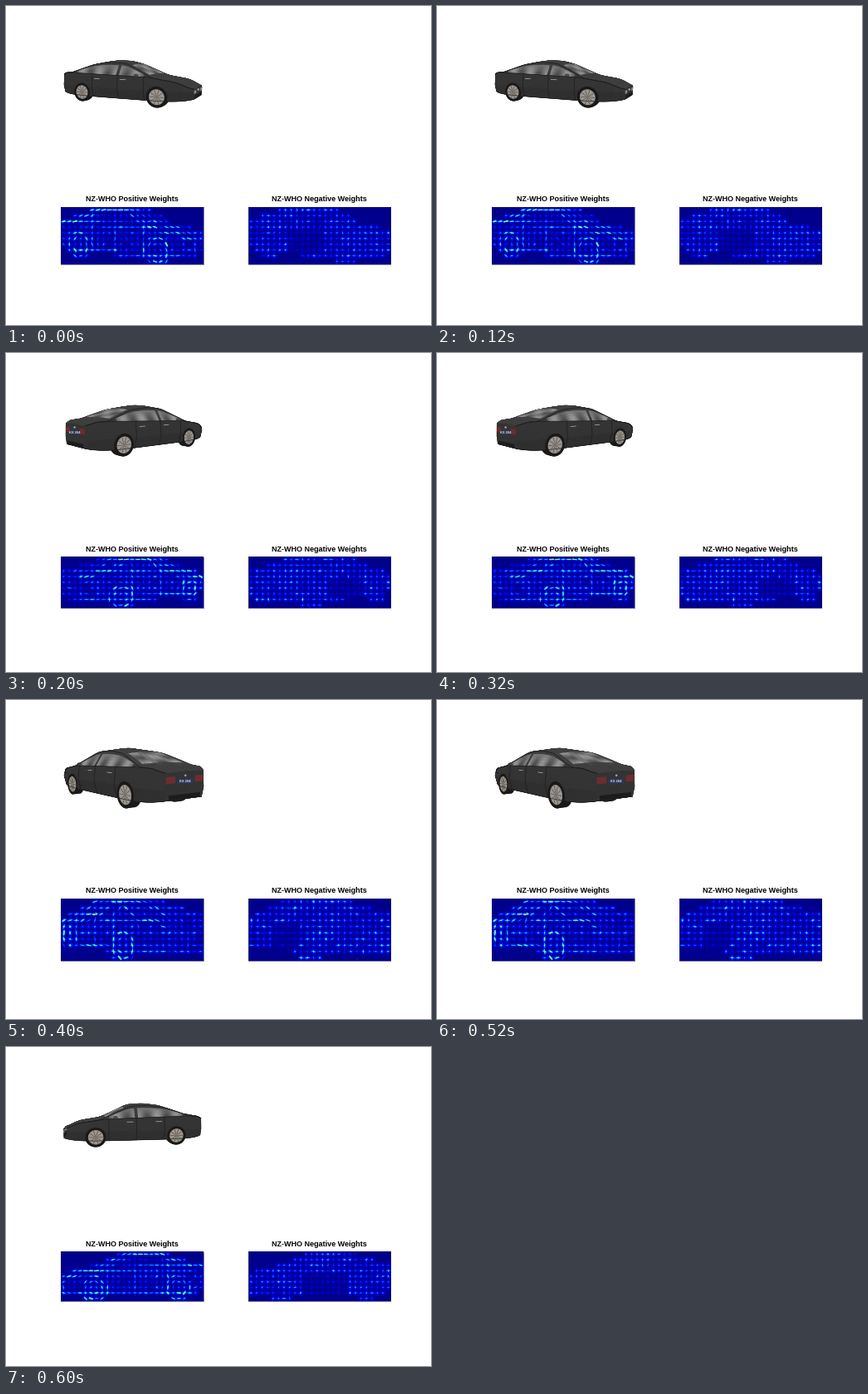
A matplotlib script for the animation above (0.8 s loop, 512 by 384 pixels).

```python
import numpy as np
import matplotlib.pyplot as plt
from matplotlib.animation import FuncAnimation
from matplotlib.collections import PolyCollection
from matplotlib.patches import Ellipse, Polygon

W, H = 512, 384
PANEL_X, PANEL_W, PANEL_MID = (66, 291.6), 171.6, 276.4
BINS, CELL = 9, 20
BLACK, SEAM, CHROME, RIM, RED = "#191919", "#1c1c1c", "#b9b9b9", "#9d9690", "#6d2c30"

# Heading in degrees (0 drives right, 90 towards the viewer), pixel box, weight grid
POSES = [(27, (70, 65.5, 236, 122.5), (25, 10)),
         (-40, (72, 63, 236, 124.5), (25, 9)),
         (-125, (70, 58, 238, 130.5), (23, 10)),
         (170, (69.5, 68, 235, 120.5), (26, 9))]

# The car in metres: x forward, y sideways, z up
LENGTH, AXLE, TRACK, TIRE_R = 2.45, 1.4, 0.9, 0.34
DOORS = (0.95, 0.05, -0.95)
DISTANCE, TILT, EYE = 9, np.radians(5), 0.7
STEPS = 5                                # subdivisions between section knots
SILL, WAIST, BELT, RAIL, TOP = range(1, 6)
HALF = np.linspace(0, TOP, TOP * STEPS + 1)
RING = np.concatenate([HALF, HALF[::-1]])

fig = plt.figure(figsize=(W / 72, H / 72), dpi=72, facecolor="white")
ax = fig.add_axes([0, 0, 1, 1])


def rounded(x, xs, ys):
    """Piecewise linear profile with softened corners."""
    return np.mean([np.interp(x + d, xs, ys) for d in np.linspace(-0.15, 0.15, 7)], axis=0)


def cabin_height(x):
    return rounded(x, [-1.9, -1.0, -0.35, 0.25, 1.2], [0, 0.38, 0.48, 0.46, 0])


def build_body():
    """Loft closed cross-sections along x, pinched shut at both bumpers."""
    x = np.linspace(-LENGTH, LENGTH, 90)
    x = np.concatenate([x[:1], x, x[-1:]])
    belt = rounded(x, [-2.45, -2.3, -1.8, 1.1, 2.0, 2.45], [0.9, 1.04, 1.05, 0.96, 0.82, 0.6])
    cabin = cabin_height(x)
    width = 0.92 * (1 - np.abs(x / 2.55) ** 6) ** 0.25
    floor = 0.2 + 0.1 * (x / LENGTH) ** 6
    none = np.zeros_like(x)
    ys = [none, 0.9 * width, width, 0.95 * width, 0.95 * width - 0.55 * cabin, none]
    zs = [floor, floor, none + 0.55, belt, belt + 0.9 * cabin, belt + cabin + 0.03]
    y = np.array([np.interp(RING, range(6), knots) for knots in np.transpose(ys)])
    z = np.array([np.interp(RING, range(6), knots) for knots in np.transpose(zs)])
    y[:, len(HALF):] *= -1
    y[[0, -1]], z[[0, -1]] = 0, 0.6
    return np.stack([np.broadcast_to(x[:, None], y.shape), y, z], axis=2)


BODY = build_body()
QUADS = np.stack([BODY[:-1, :-1], BODY[1:, :-1], BODY[1:, 1:], BODY[:-1, 1:]],
                 axis=2).reshape(-1, 4, 3)


def paint():
    """Grey level of each body quad: shaded paint, or windows by position."""
    mid = QUADS.mean(axis=1)
    normal = np.cross(QUADS[:, 2] - QUADS[:, 0], QUADS[:, 3] - QUADS[:, 1])
    normal /= np.linalg.norm(normal, axis=1, keepdims=True) + 1e-9
    outward = mid - (0, 0, 0.6)
    outward[:, 0] = 0
    upward = normal[:, 2] * np.sign((normal * outward).sum(axis=1))
    grey = 0.2 + 0.05 * upward

    knot, part = np.divmod(np.tile((RING[:-1] + RING[1:]) / 2, len(BODY) - 1), 1)
    x, y, _ = mid.T
    cabin = cabin_height(x)
    side = (knot == BELT) & (part < 0.85) & (cabin > 0.12) & (np.abs(x - DOORS[1]) > 0.06)
    screen = (knot == RAIL) & (part > 0.2) & (cabin > 0.06) & (cabin < 0.37)
    glass = side | screen
    grey[glass] = (0.46 + 0.16 * np.cos(9 * x) * np.cos(7 * y))[glass]
    return grey


GREY = paint()


def disc(x, y, radius):
    t = np.linspace(0, 2 * np.pi, 41)
    return np.column_stack([x + radius * np.cos(t), np.full_like(t, y),
                            TIRE_R + radius * np.sin(t)])


def project(points, heading):
    """Perspective view; returns screen points (y down) and nearness."""
    x, y, z = np.moveaxis(np.asarray(points, float), -1, 0)
    c, s = np.cos(heading), np.sin(heading)
    across, near, up = x * c - y * s, x * s + y * c, z - EYE
    depth = near * np.cos(TILT) + up * np.sin(TILT)
    rise = up * np.cos(TILT) - near * np.sin(TILT)
    scale = 1 / (1 - depth / DISTANCE)
    return np.stack([across * scale, -rise * scale], axis=-1), depth


class View:
    def __init__(self, degrees, box, grid):
        self.heading = np.radians(degrees)
        self.grid = grid
        self.corner, self.size = np.array(box[:2]), np.subtract(box[2:], box[:2])
        self.side = 1 if np.cos(self.heading) > 0 else -1
        solid = [BODY.reshape(-1, 3)]
        solid += [disc(x, y, TIRE_R) for x in (-AXLE, AXLE) for y in (-TRACK, TRACK)]
        flat = project(np.concatenate(solid), self.heading)[0]
        self.low, self.span = flat.min(axis=0), np.ptp(flat, axis=0)
        self.outline = self.pixels(np.concatenate(solid))
        self.top = PANEL_MID - PANEL_W / grid[0] * grid[1] / 2

    def pixels(self, points):
        flat = project(points, self.heading)[0]
        return self.corner + (flat - self.low) / self.span * self.size

    def cells(self, points):
        return (self.pixels(points) - self.corner) / self.size * self.grid

    def near_index(self, knot):
        return knot * STEPS if self.side > 0 else len(RING) - 1 - knot * STEPS

    def rail(self, knot):
        return BODY[1:-1, self.near_index(knot)]

    def section(self, x, start, end):
        i = np.abs(BODY[:, 0, 0] - x).argmin()
        a, b = sorted((self.near_index(start), self.near_index(end)))
        return BODY[i, a:b + 1]


VIEWS = [View(*pose) for pose in POSES]


def stroke_templates():
    """One soft bar per orientation bin, as in a gradient histogram glyph."""
    y, x = np.mgrid[:CELL, :CELL] - (CELL - 1) / 2
    angle = (np.arange(BINS) * np.pi / BINS)[:, None, None]
    along = np.abs(x * np.cos(angle) + y * np.sin(angle))
    across = y * np.cos(angle) - x * np.sin(angle)
    return np.exp(-(across / 1.7) ** 2) * (along < CELL * 0.45)


STROKES = stroke_templates()


def add_contour(weights, points, gain):
    """Add a polyline, in cell units, to the orientation histograms it crosses."""
    rows, cols, _ = weights.shape
    for start, end in zip(points[:-1], points[1:]):
        dx, dy = end - start
        length = np.hypot(dx, dy)
        n = max(1, round(length * 12))
        spots = start + (end - start) * (np.arange(n) + 0.5)[:, None] / n
        c = np.clip(spots[:, 0].astype(int), 0, cols - 1)
        r = np.clip(spots[:, 1].astype(int), 0, rows - 1)
        b = round(np.arctan2(dy, dx) % np.pi / np.pi * BINS) % BINS
        np.add.at(weights, (r, c, b), gain * length / n)


def covered_cells(view):
    cols, rows = view.grid
    spots = (view.outline - view.corner) / view.size * view.grid
    inside = np.zeros((rows, cols), bool)
    for c in range(cols):
        column = spots[np.abs(spots[:, 0] - c - 0.5) < 0.6, 1]
        inside[int(column.min()):int(np.ceil(column.max())), c] = True
    return inside


def glyph_image(weights):
    rows, cols, _ = weights.shape
    image = np.einsum("rco,oij->ricj", weights, STROKES)
    return image.reshape(rows * CELL, cols * CELL)


def weight_images(view, seed):
    rng = np.random.default_rng(seed)
    cols, rows = view.grid
    inside = covered_cells(view)[..., None]

    edges = np.zeros((rows, cols, BINS))
    for knot in (SILL, BELT, RAIL, TOP):
        add_contour(edges, view.cells(view.rail(knot)), 0.22)
    for x in (-LENGTH, *DOORS, LENGTH):
        add_contour(edges, view.cells(view.section(x, SILL, TOP)), 0.2)
    hubs = []
    for x in (-AXLE, AXLE):
        add_contour(edges, view.cells(disc(x, view.side * TRACK, TIRE_R)), 0.42)
        add_contour(edges, view.cells(disc(x, view.side * TRACK, TIRE_R * 0.45)), 0.2)
        add_contour(edges, view.cells(disc(x, -view.side * TRACK, TIRE_R)), 0.12)
        hubs.append(view.cells((x, view.side * TRACK, TIRE_R)))
    edges *= rng.uniform(0.5, 1.3, (rows, cols, 1))
    haze = 0.09 * rng.random((rows, cols, BINS)) ** 3
    haze[..., 0] += 0.24 * rng.random((rows, 1)) * rng.random((rows, cols))
    positive = np.minimum(edges, 0.5) + haze * inside

    negative = 0.085 * rng.random((rows, cols, BINS)) ** 2
    negative[..., 0] += 0.22 * rng.random((rows, cols))
    negative[..., 4:6] += 0.07 * rng.random((rows, cols, 1))
    negative *= rng.uniform(0.6, 1.15, (rows, cols, 1)) * inside
    # The plain doors between the wheels carry little weight.
    cy, cx = np.mgrid[:rows, :cols] + 0.5
    middle, gap = np.mean(hubs, axis=0), abs(hubs[1][0] - hubs[0][0])
    doors = (np.abs(cx - middle[0]) < 0.25 * gap) & (np.abs(cy - middle[1] + 1) < 0.2 * rows)
    negative[doors] *= 0.3
    return glyph_image(positive), glyph_image(negative)


def fill(points, color, edge="none", width=0.0):
    ax.add_patch(Polygon(points, facecolor=color, edgecolor=edge, linewidth=width))


def line(points, color, width=0.7):
    ax.plot(*np.transpose(points), color=color, lw=width)


def draw_wheel(view, x):
    y = view.side * TRACK
    for share, color in ((1, BLACK), (0.74, RIM)):
        fill(view.pixels(disc(x, y, TIRE_R * share)), color)
    inner, outer = (view.pixels(disc(x, y, TIRE_R * k)) for k in (0.2, 0.68))
    for spoke in range(0, 40, 4):
        line([inner[spoke], outer[spoke]], "#55504c", 0.7)
    fill(view.pixels(disc(x, y, TIRE_R * 0.16)), "#77716c")


def draw_end(view):
    """Lamps, badge and number plate on whichever bumper faces the viewer."""
    front = np.sin(view.heading) > 0
    x = (LENGTH + 0.01) * (1 if front else -1)

    def block(y, z, half_width, half_height, color):
        signs = [(-1, -1), (1, -1), (1, 1), (-1, 1)]
        fill(view.pixels([(x, y + a * half_width, z + b * half_height) for a, b in signs]), color)

    block(0, 0.36, 0.5, 0.06, SEAM)
    for y in (-0.45, 0.45):
        block(y, 0.52 if front else 0.77, 0.14, 0.05 if front else 0.08,
              "#8d8d8d" if front else RED)
    badge = view.pixels((x, 0, 0.55 if front else 0.86))
    ax.add_patch(Ellipse(badge, 2.6, 2.6, facecolor="#a0a0a0", edgecolor="none"))
    if not front:
        block(0, 0.72, 0.25, 0.065, "#2b3759")
        ax.text(*view.pixels((x, 0, 0.72)), "KX 204", color="#d5d8e0", fontsize=4,
                ha="center", va="center_baseline", family="Liberation Sans", weight="bold")


def draw_car(view):
    for y in np.linspace(-TRACK, TRACK, 25):
        if abs(y) > 0.65:
            for x in (-AXLE, AXLE):
                fill(view.pixels(disc(x, y, TIRE_R)), BLACK)
    order = project(QUADS, view.heading)[1].mean(axis=1).argsort()
    shades = np.repeat(GREY[order, None], 3, axis=1)
    ax.add_collection(PolyCollection(view.pixels(QUADS[order]), facecolors=shades,
                                     edgecolors=shades, linewidths=0.3))
    for knot in (SILL, BELT, RAIL):
        line(view.pixels(view.rail(knot)), SEAM)
    for x in DOORS:
        line(view.pixels(view.section(x, SILL, BELT)), SEAM)
    for x in DOORS[1:]:
        handle = [(x + d, view.side * 0.92, 0.86) for d in (0.1, 0.3)]
        line(view.pixels(handle), CHROME)
    mirror = view.pixels((0.75, view.side * 0.98, 1.02))
    ax.add_patch(Ellipse(mirror, 6, 4, facecolor="#4b4b4b", edgecolor="none"))
    for x in (-AXLE, AXLE):
        draw_wheel(view, x)
    draw_end(view)


def draw_panel(x, top, name, image):
    right, bottom = x + PANEL_W, 2 * PANEL_MID - top
    # The negative minimum starts the colour map at a slightly brighter navy.
    ax.imshow(image, cmap="jet", vmin=-0.014, vmax=1, aspect="auto",
              extent=(x, right, bottom, top))
    fill([(x, top), (right, top), (right, bottom), (x, bottom)], "none", "#20203c", 0.5)
    ax.text(x + PANEL_W / 2, top - 6.8, f"NZ-WHO {name} Weights", fontsize=9, weight="bold",
            family="Liberation Sans", ha="center", va="baseline")


IMAGES = [weight_images(view, seed) for seed, view in enumerate(VIEWS)]


def update(i):
    ax.clear()
    for x, name, image in zip(PANEL_X, ("Positive", "Negative"), IMAGES[i]):
        draw_panel(x, VIEWS[i].top, name, image)
    draw_car(VIEWS[i])
    ax.set(xlim=(0, W), ylim=(H, 0))
    ax.axis("off")
    return []


anim = FuncAnimation(fig, update, frames=len(VIEWS), init_func=lambda: [],
                     interval=200, repeat=True, repeat_delay=0)
plt.show()
```
